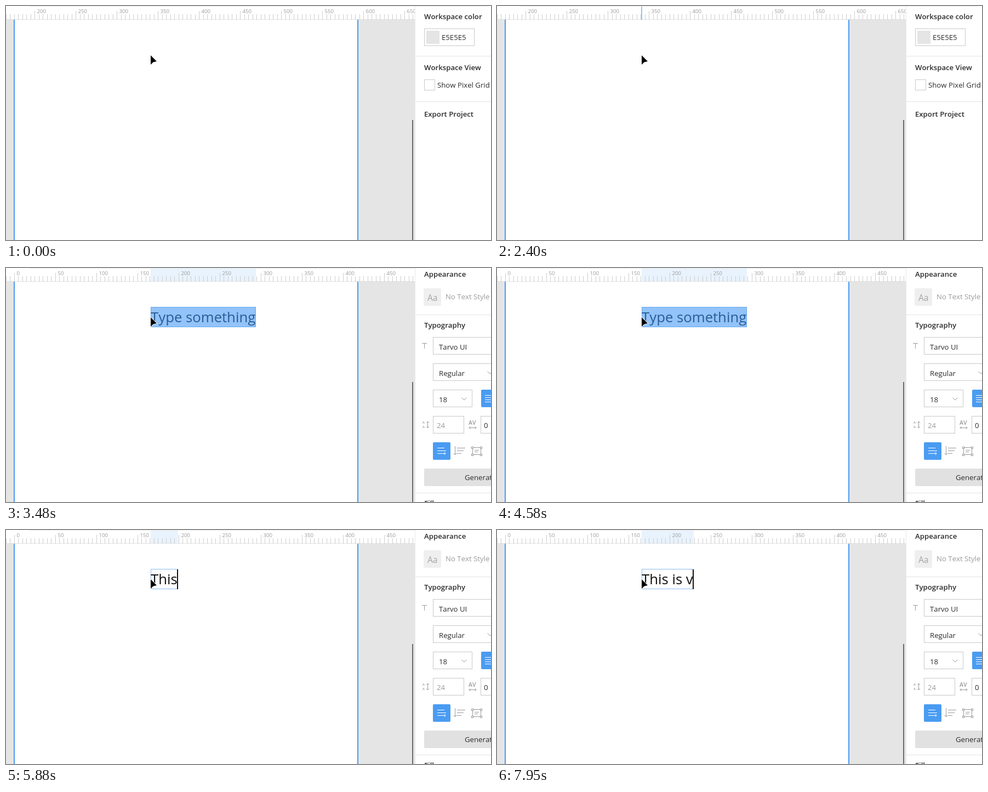
Recreate the animation shown at these times as an HTML page with a canvas. Size 885 by 427 pixels, loop 8000 ms.

```html
<!DOCTYPE html>
<html lang="en">
<head>
<meta charset="utf-8">
<title>Typing into a text layer</title>
<style>
html, body { margin: 0; width: 100%; height: 100%; overflow: hidden; background: #fff; }
canvas { display: block; }
</style>
</head>
<body>
<canvas id="stage" width="885" height="427"></canvas>
<script>
const c = document.getElementById('stage').getContext('2d');
const LOOP = 8000, OPEN = 2780, LEFT = 264;
const BLUE = '#4a9cf2', INK = '#2b2b2b', GREY = '#9a9a9a', EDGE = '#c9c9c9';
const FAMILY = '"Open Sans", "Noto Sans", sans-serif';
const PHRASE = 'This is v';

// [time, letters typed]; the ruler runs slightly ahead of the text
const TYPED = [[4720, 1], [4960, 2], [5780, 3], [5880, 4], [6580, 5], [7190, 6], [7270, 7], [7500, 8], [7950, 9]];
const RULED = [[4640, 1], [4800, 2], [5510, 3], [5780, 4], [6500, 5], [7110, 6], [7190, 7], [7500, 8], [7950, 9]];
const CARET_OFF = [[5360, 5780], [6340, 6500]];

const countAt = (steps, t) => steps.reduce((n, [at, k]) => t >= at ? k : n, 0);

function rect(x, y, w, h, fill) {
  c.fillStyle = fill;
  c.fillRect(x, y, w, h);
}

function frame(x, y, w, h, color = EDGE) {
  c.strokeStyle = color;
  c.lineWidth = 1;
  c.strokeRect(x + .5, y + .5, w - 1, h - 1);
}

function round(x, y, w, h, fill) {
  c.fillStyle = fill;
  c.beginPath();
  c.roundRect(x, y, w, h, 2);
  c.fill();
}

function text(s, x, y, color = INK, size = 13.2, weight = 400) {
  c.font = `${weight} ${size}px ${FAMILY}`;
  c.fillStyle = color;
  c.fillText(s, x, y);
}

const title = (s, y) => text(s, 763, y, INK, 13.2, 600);
const divider = y => rect(747, y, 138, 1, '#e3e3e3');

function path(d, color = GREY, width = 1) {
  c.strokeStyle = color;
  c.lineWidth = width;
  c.stroke(new Path2D(d));
}

function layerWidth(s) {
  c.font = `25.7px ${FAMILY}`;
  return c.measureText(s).width;
}

function workspace() {
  rect(0, 25, 746, 402, '#e5e5e5');
  rect(14, 25, 629, 402, BLUE);
  rect(16, 25, 625, 402, '#fff');
  rect(741, 208, 2, 219, '#6b6b6b');
}

function ruler(zero, from, to, tint) {
  c.save();
  c.beginPath();
  c.rect(0, 0, 746, 25);
  c.clip();
  rect(0, 0, 746, 25, '#fff');
  rect(43, 0, 703, 1, '#ececec');
  if (to > from) rect(from, 1, to - from, 24, tint);
  rect(0, 24, 746, 1, '#e2e2e2');
  for (let i = Math.ceil(-zero / 7.5); zero + i * 7.5 < 746; i++) {
    const x = Math.floor(zero + i * 7.5), major = i % 10 === 0;
    rect(x, major ? 9 : 15, 1, major ? 16 : 10, '#cdcdcd');
    if (major) text(i * 5, x + 4.5, 13, '#999', 9.6);
  }
  c.restore();
}

function projectPanel() {
  title('Workspace color', 24);
  frame(763, 41, 92, 32);
  rect(767, 45, 24, 24, '#e5e5e5');
  text('E5E5E5', 795, 62);
  divider(91);
  title('Workspace View', 117);
  frame(763, 134, 20, 20);
  text('Show Pixel Grid', 787, 149);
  divider(174);
  title('Export Project', 202);
}

function textPanel() {
  title('Appearance', 16);
  round(762, 37, 32, 32, '#efefef');
  text('Aa', 769, 60, '#a5a5a5', 15.6);
  text('No Text Style', 802, 57, GREY);
  divider(85);

  title('Typography', 109);
  path('M759 137.5h9M763.5 137v10');
  frame(779, 126, 120, 32);
  text('Tarvo UI', 790, 149);
  frame(779, 174, 120, 32);
  text('Regular', 790, 197);
  path('M878.5 188.5l4.5 4.5 4.5-4.5');
  frame(779, 222, 72, 32);
  text('18', 790, 245);
  path('M831.5 236.5l4.5 4.5 4.5-4.5');
  round(867, 222, 32, 32, BLUE);
  path('M874 232.5h16M874 236.5h16M874 240.5h16M874 244.5h16', '#fff');

  text('A', 760, 284, GREY, 6, 600);
  text('A', 760, 292, GREY, 6, 600);
  path('M769.5 280v12M767 282.5l2.5-2.5 2.5 2.5M767 289.5l2.5 2.5 2.5-2.5');
  frame(779, 270, 57, 32);
  text('24', 786, 292, GREY);
  text('AV', 844, 286, GREY, 10.5, 600);
  path('M845 291.5h13M847.5 289l-2.5 2.5 2.5 2.5M855.5 289l2.5 2.5-2.5 2.5');
  frame(866, 270, 40, 32);
  text('0', 872, 292);

  round(779, 318, 32, 32, BLUE);
  path('M787 328.5h13M787 333.5h16M787 338.5h15M799.5 336l2.5 2.5-2.5 2.5', '#fff');
  path('M819.5 325v16M816.5 338l3 3 3-3M823 328.5h15M823 333.5h12M823 338.5h8');
  path('M851.5 327.5h15v13h-15zM855 332.5h8M855 335.5h6');
  for (const x of [849, 865]) for (const y of [326, 339]) {
    rect(x, y, 4, 4, '#fff');
    frame(x, y, 4, 4, GREY);
  }

  round(763, 366, 130, 32, '#e1e1e1');
  text('Generate', 837, 387);
  divider(410);
  title('Fill', 434);
}

function textLayer(t) {
  const n = countAt(TYPED, t);
  const s = n ? PHRASE.slice(0, n) : 'Type something';
  const w = Math.round(layerWidth(s));
  if (!n) rect(LEFT, 71, w + 1, 37, '#92c3f9');
  frame(LEFT, 71, w + 1, 37, n ? '#8abdf0' : '#64a9ec');
  text(s, LEFT, 99, n ? '#111' : '#2a5c98', 25.7);
  if (n && !CARET_OFF.some(([a, b]) => t >= a && t < b)) rect(LEFT + w - 1, 72, 2, 36, '#111');
}

function pointer() {
  const arrow = new Path2D('M264 90V107L268.6 102.4L275 101Z');
  c.strokeStyle = '#fff';
  c.lineWidth = 1.6;
  c.stroke(arrow);
  c.fillStyle = '#000';
  c.fill(arrow);
}

function draw(now) {
  const t = now % LOOP, editing = t >= OPEN;
  c.fontKerning = 'none';
  rect(0, 0, 885, 427, '#fff');
  workspace();
  if (editing) {
    const n = countAt(RULED, t);
    const w = layerWidth(n ? PHRASE.slice(0, n) : 'Type something');
    ruler(15, LEFT, LEFT + Math.round(w) + 1, '#e8f3fd');
  } else {
    ruler(-247.5, 0, 0);
    if (t >= 1240) rect(263, 1, 2, 24, '#92c5f7');
  }
  rect(746, 0, 139, 427, '#fff');
  rect(746, 0, 1, 427, '#e9e9e9');
  if (editing) {
    textPanel();
    textLayer(t);
  } else {
    rect(747, 0, 132, 1, '#ececec');
    projectPanel();
  }
  pointer();
}

const start = performance.now();
function tick() {
  draw(performance.now() - start);
  requestAnimationFrame(tick);
}
tick();
</script>
</body>
</html>
```
